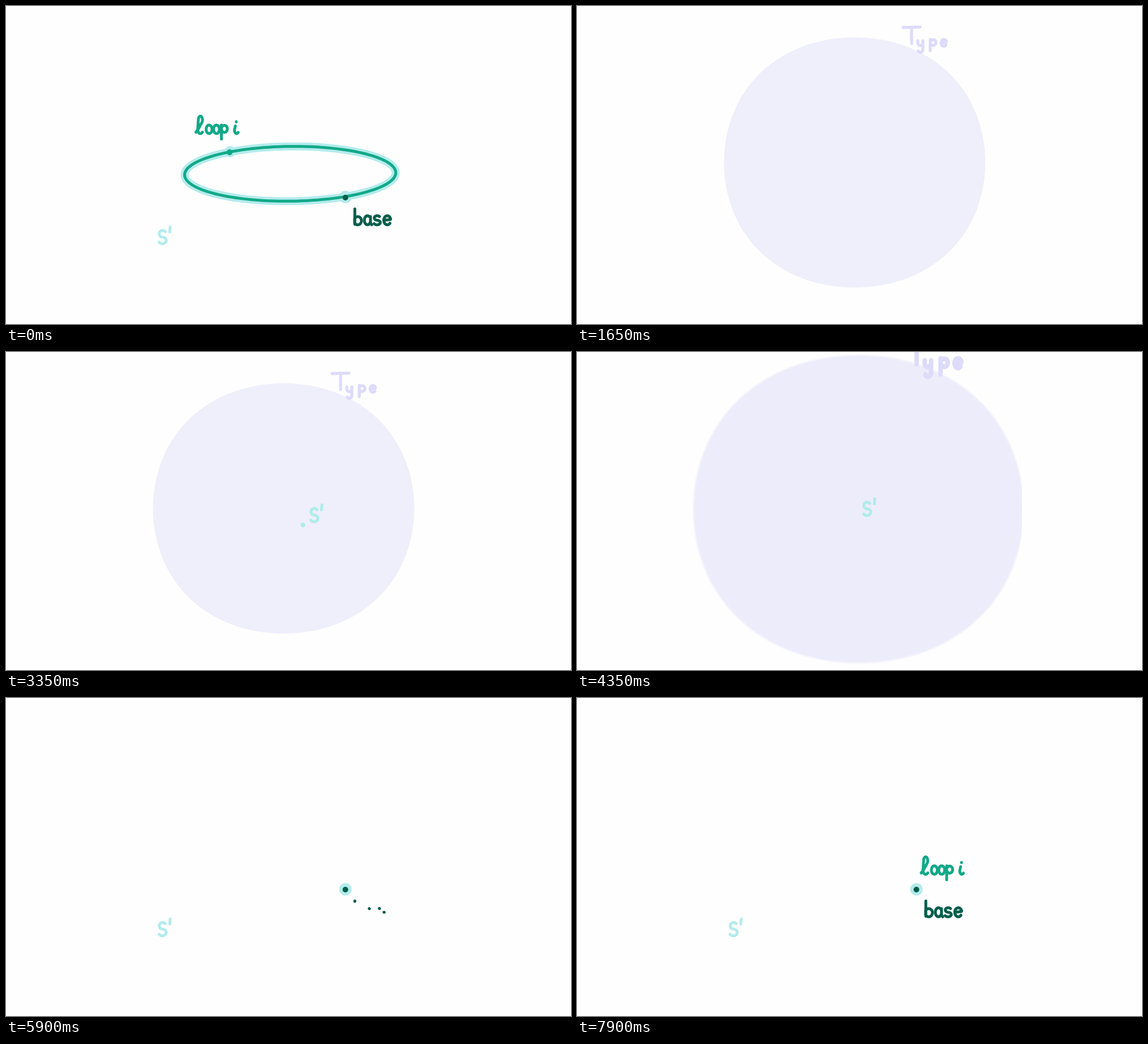
Animation, 998 px wide and 561 px high, one loop 8 s. Source, as an HTML page with a canvas:

```html
<!DOCTYPE html>
<html lang="en">
<head>
<meta charset="utf-8">
<title>Loop and base</title>
<style>
html, body { margin: 0; width: 100%; height: 100%; overflow: hidden; background: #fefefe; }
canvas { display: block; width: 998px; height: 561px; }
</style>
</head>
<body>
<canvas id="stage" width="998" height="561" role="img" aria-label="S1, base, loop i, Type"></canvas>
<script>
const ctx = document.getElementById('stage').getContext('2d');
const W = 998, H = 561, LOOP = 8000;
const PAPER = '#fefefe', GLOW = '#b4ebed', MINT = '#aeede9', GREEN = '#12a988',
      DARK = '#045e4b', DISC = '#efeefb', DISC_NEAR = '#edecfb', LILAC = '#dddbfa';

const rad = deg => deg * Math.PI / 180;
const lerp = (a, b, u) => a + (b - a) * u;
const ramp = (t, a, b) => Math.max(0, Math.min(1, (t - a) / (b - a)));

// Points on an arc; angles in degrees, clockwise from the right
function arc(cx, cy, rx, ry, from, to, n = 20) {
  return Array.from({ length: n + 1 }, (_, i) => {
    const a = rad(lerp(from, to, i / n));
    return [cx + rx * Math.cos(a), cy + ry * Math.sin(a)];
  });
}

// Hand-drawn disc: slightly square, swollen towards one side
function blob(cx, cy, rx, ry, lean, side) {
  return arc(0, 0, 1, 1, 0, 360, 120).map(([x, y]) => {
    const a = Math.atan2(y, x);
    const r = 1.007 + lean * Math.cos(a - rad(side)) - 0.008 * Math.cos(4 * a);
    return [cx + rx * r * x, cy + ry * r * y];
  });
}

// Pen strokes; 0 is the top of a small letter and 1 the baseline
const GLYPHS = {
  o: [arc(0.5, 0.5, 0.5, 0.5, -50, -410)],
  b: [[[0.05, -0.75], [0.05, 0.95], ...arc(0.45, 0.55, 0.5, 0.45, -150, 150)]],
  a: [[...arc(0.42, 0.5, 0.42, 0.5, -50, -350), [0.83, 0.1], [0.83, 0.75], [1, 1]]],
  s: [[...arc(0.48, 0.25, 0.4, 0.25, -40, -270), ...arc(0.45, 0.75, 0.45, 0.25, -90, 150)]],
  e: [[[0.05, 0.5], [0.9, 0.42], ...arc(0.5, 0.5, 0.48, 0.5, -15, -320)]],
  l: [[[0, 0.85], [0.5, 0.35], ...arc(0.75, -0.6, 0.35, 0.45, 30, -180),
       ...arc(0.75, 0.55, 0.45, 0.45, 180, 40)]],
  p: [[[0, 0], [0, 1.65], [0, 0.3], ...arc(0.5, 0.45, 0.5, 0.42, -150, 150)]],
  i: [[[0.25, 0.1], ...arc(0.45, 0.6, 0.35, 0.4, 180, 40)], [[0.4, -0.4], [0.4, -0.36]]],
  y: [[[0, 0.2], ...arc(0.45, 0.5, 0.45, 0.4, 180, 0), [0.9, 0.2], ...arc(0.45, 1.5, 0.42, 0.4, 0, 150)]],
  T: [[[0, 0], [1, -0.03]], [[0.5, 0], [0.5, 1]]],
  "'": [[[0, -0.27], [-0.05, 0.12]]]
};
function letters(text, xs, top, w, h) {
  return xs.flatMap((x, i) =>
    GLYPHS[text[i]].map(s => s.map(([u, v]) => [x + u * w, top + v * h])));
}

const sOne = letters("s'", [269.5, 290], 396, 15, 23.5);
const base = letters('base', [615.5, 633, 649.5, 667], 370, 13, 16);
const loopI = letters('loopi', [608, 626, 639, 653, 675], 296, 10.5, 15);
const typeWord = [...letters('T', [576], 38, 30, 28), ...letters('ype', [602, 624, 643], 59, 10, 12)];
const ring = arc(502, 296, 186.5, 48.3, 0, 360, 120).map(([x, y]) => [x, y - (x - 502) * 0.01]);
const disc = blob(489, 276, 231, 221, 0.006, 0);
const discNear = blob(494.5, 273, 292, 272, 0.018, 60);

// Path along the leading part of a polyline
function trace(pts, part = 1) {
  const step = i => Math.hypot(pts[i][0] - pts[i - 1][0], pts[i][1] - pts[i - 1][1]);
  let left = 0;
  for (let i = 1; i < pts.length; i++) left += step(i) * part;
  ctx.beginPath();
  ctx.moveTo(...pts[0]);
  for (let i = 1; i < pts.length && left > 0; i++) {
    const d = step(i), u = d ? Math.min(1, left / d) : 1;
    ctx.lineTo(lerp(pts[i - 1][0], pts[i][0], u), lerp(pts[i - 1][1], pts[i][1], u));
    left -= d;
  }
}
function stroke(pts, color, width, part) {
  trace(pts, part);
  ctx.strokeStyle = color;
  ctx.lineWidth = width;
  ctx.stroke();
}
function fill(pts, color) {
  trace(pts);
  ctx.fillStyle = color;
  ctx.fill();
}
function dot(x, y, r, color) {
  ctx.beginPath();
  ctx.arc(x, y, r, 0, 7);
  ctx.fillStyle = color;
  ctx.fill();
}
function write(strokes, color, width, part = 1, dx = 0, dy = 0) {
  if (part <= 0) return;
  ctx.save();
  ctx.translate(dx, dy);
  strokes.forEach(s => stroke(s, color, width, part));
  ctx.restore();
}
function zoom(x, y, s) {
  ctx.translate(x, y);
  ctx.scale(s, s);
  ctx.translate(-x, -y);
}

function fullLoop() {
  stroke(ring, GLOW, 14);
  dot(396, 257, 10, GLOW);
  dot(599.5, 337, 11, GLOW);
  stroke(ring, GREEN, 5);
  dot(395, 258, 5.3, GREEN);
  dot(599.5, 338, 5, DARK);
  write(loopI, GREEN, 5, 1, -272.5, -86);
  write(base, DARK, 5);
  write(sOne, GLOW, 5);
}

function typeDisc(t) {
  ctx.save();
  zoom(495, 271, ramp(t, 1050, 1650));
  fill(disc, DISC);
  write(typeWord, LILAC, 5.3);
  ctx.restore();
  if (t >= 1900) {
    const u = ramp(t, 1850, 2500);
    ctx.globalAlpha = lerp(0.3, 1, u);
    dot(lerp(522, 524.5, u), lerp(303, 305, u), lerp(36, 1.5, u) + 2.7 * ramp(t, 2600, 3000), MINT);
    ctx.globalAlpha = 1;
  }
  write(sOne, MINT, 5, ramp(t, 2600, 3350), 268, -120);
}

function diveIn(t) {
  const u = ramp(t, 4350, 4650);
  ctx.save();
  ctx.beginPath();
  ctx.rect(203, 0, lerp(583, 641, u), H);
  ctx.clip();
  ctx.globalAlpha = 1 - u;
  zoom(523, 280, lerp(1, 1.22, u));
  ctx.filter = 'blur(1.5px)';
  fill(discNear, DISC_NEAR);
  ctx.filter = 'none';
  ctx.translate(600, 24);
  ctx.scale(1.28, 1.4);
  ctx.translate(-591, -68);
  write(typeWord, LILAC, 6.2);
  ctx.restore();
  write(sOne, MINT, 5, 1, lerp(236, 0, u), lerp(-131, 0, u));
}

function buildLoop(t) {
  write(sOne, GLOW, 5);
  if (t >= 5400) {
    const u = ramp(t, 5350, 5850);
    ctx.globalAlpha = lerp(0.2, 1, u);
    dot(599.5, 337.5, lerp(24, 11, u), GLOW);
    dot(599.5, 338, lerp(11, 5, u), DARK);
    ctx.globalAlpha = 1;
  }
  if (t >= 5900) write(base, DARK, 5, ramp(t, 5900, 6350) || 0.01);
  write(loopI, GREEN, 5, ramp(t, 7300, 7900));
}

function draw(t) {
  ctx.fillStyle = PAPER;
  ctx.fillRect(0, 0, W, H);
  ctx.lineCap = ctx.lineJoin = 'round';
  if (t < 100) fullLoop();
  else if (t < 1100) return;
  else if (t < 4350) typeDisc(t);
  else if (t < 4650) diveIn(t);
  else buildLoop(t);
}

const start = performance.now();
function tick() {
  const t = (performance.now() - start) % LOOP;
  draw(Math.floor(t / 50) * 50);
  requestAnimationFrame(tick);
}
tick();
</script>
</body>
</html>
```
